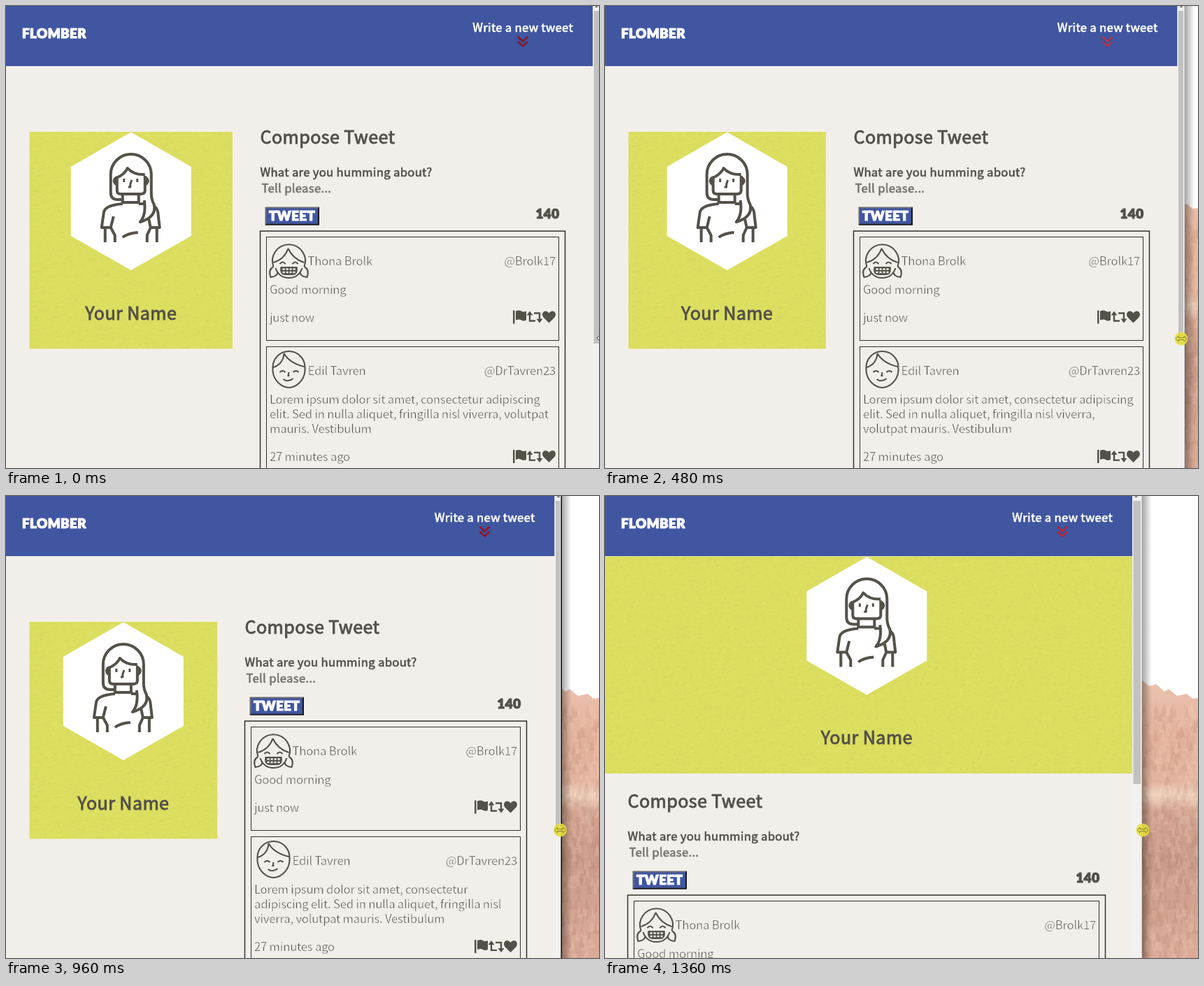
Write an HTML page with a canvas that moves like this. It is 848x661 px and loops after 1480 ms.

```html
<!DOCTYPE html>
<html lang="en">
<head>
<meta charset="utf-8">
<title>Responsive layout</title>
<style>
html, body { margin: 0; width: 100%; height: 100%; overflow: hidden; }
canvas { display: block; }
</style>
</head>
<body>
<canvas id="stage" width="848" height="661"></canvas>
<script>
const c = document.getElementById('stage').getContext('2d');
const LOOP = 1480, INK = '#545149', BLUE = '#4056a1', PAPER = '#f2efeb';
const SANS = '"Noto Sans CJK JP", "Noto Sans CJK SC", "Noto Sans", sans-serif';

// grow thickens (or thins, when negative) the letters, in pixels.
const LIGHT = { font: '400 16.7px ' + SANS, grow: -.5 };
const BOLD = { font: '400 16.7px ' + SANS, grow: .65 };
const HEAD = { font: '400 25.07px ' + SANS, grow: .95 };
const BLOCK = { font: '900 18.6px Lato, sans-serif', grow: 1.2 };
const LOREM = 'Lorem ipsum dolor sit amet, consectetur adipiscing elit. Sed in nulla aliquet, ' +
  'fringilla nisl viverra, volutpat mauris. Vestibulum';

// The picture only changes at these times.
const STEPS = [0, 130, 200, 270, 350, 420, 480, 550, 610, 680, 750, 820, 880, 960,
  1030, 1090, 1160, 1220, 1290, 1360];

// time, page width, window edge, pointer x, pointer y, edge line opacity, arrow red, arrow green
const KEYS = [
  [0, 839, 851, 853, 475, 1, 150, 20],
  [270, 838, 847, 842, 476, 1, 214, 48],
  [480, 818.5, 829, 824, 476, 0, 205, 55],
  [820, 794, 805.5, 803, 477, 1, 200, 26],
  [960, 784.5, 794.5, 792.5, 478, 1, 168, 15],
  [1090, 776.5, 785, 783.5, 478, 1, 84, 20],
  [1360, 754, 768, 769, 478, 0, 214, 36]
];

function sample(t) {
  let i = 0;
  while (i < KEYS.length - 2 && t >= KEYS[i + 1][0]) i++;
  const a = KEYS[i], b = KEYS[i + 1], f = Math.min(1, (t - a[0]) / (b[0] - a[0]));
  return a.map((v, k) => v + (b[k] - v) * f);
}

let seed = 7;
const rnd = () => (seed = seed * 16807 % 2147483647) / 2147483647;

function rect(x, y, w, h, color) {
  c.fillStyle = color;
  c.fillRect(x, y, w, h);
}

function frame(x, y, right, bottom, width) {
  c.strokeStyle = '#35322d';
  c.lineWidth = width;
  c.strokeRect(x, y, right - x, bottom - y);
}

function setType(style) {
  c.font = style.font;
  c.letterSpacing = style.grow * .45 + 'px';
}

function text(s, x, y, style, color = INK, align = 'left') {
  setType(style);
  c.textAlign = align;
  c.fillStyle = color;
  c.fillText(s, x, y);
  c.strokeStyle = style.grow < 0 ? PAPER : color;
  c.lineWidth = Math.abs(style.grow);
  c.strokeText(s, x, y);
}

function stroke(d, width, color = INK) {
  c.strokeStyle = color;
  c.lineWidth = width;
  c.stroke(new Path2D(d));
}

function fill(d, color = INK) {
  c.fillStyle = color;
  c.fill(new Path2D(d));
}

function at(x, y, draw) {
  c.save();
  c.translate(x, y);
  draw();
  c.restore();
}

function makeTexture() {
  const tile = document.createElement('canvas');
  tile.width = tile.height = 180;
  const g = tile.getContext('2d');
  g.fillStyle = '#dcde60';
  g.fillRect(0, 0, 180, 180);
  for (let i = 0; i < 1500; i++) {
    g.fillStyle = rnd() < .5 ? 'rgba(205,200,88,.4)' : 'rgba(230,232,112,.4)';
    g.fillRect(rnd() * 180, rnd() * 180, 1 + rnd() * 4, 1);
  }
  return c.createPattern(tile, 'repeat');
}
const texture = makeTexture();

function makeTrees() {
  let d = '';
  for (let i = 0; i < 260; i++) {
    d += `M${740 + rnd() * 110} ${295 + rnd() * 370}l4 ${12 + rnd() * 8}h-8Z`;
  }
  return d;
}
const darkTrees = makeTrees(), paleTrees = makeTrees();

function backdrop() {
  rect(0, 0, 848, 661, '#fff');
  const g = c.createLinearGradient(0, 265, 0, 661);
  [[0, '#ecc3af'], [.2, '#e2b09a'], [.36, '#e2b39d'], [.41, '#f0d2be'], [.47, '#d3a591'],
    [.65, '#c89a87'], [.85, '#d5a592'], [1, '#dbab97']].forEach(s => g.addColorStop(...s));
  fill('M740 262 L770 265 L778 272 L788 269 L800 280 L806 276 L818 286 L832 283 L840 290 L848 289 V661 H740Z', g);
  fill(darkTrees, 'rgba(150,95,75,.12)');
  fill(paleTrees, 'rgba(255,225,205,.15)');
}

function woman() {
  c.lineJoin = 'round';
  stroke('M-12 97H-19Q-29 97 -29 87V61A29 29 0 0 1 29 61V88Q29 97 33 104Q37 122 13 129Q22 119 19 98' +
    'M-20 65V84Q-20 89 -15 89H14Q20 89 20 84V63M-21 66Q-9 61 -5 52Q4 62 20 61' +
    'M-12 91V101H11V91M-20 65Q-28 70 -20 76M20 65Q28 70 20 76' +
    'M-12 103Q-38 105 -39 116L-42 137H-29L-25 121M11 103H19M34 107Q39 111 39 120L41 137H28L25 123' +
    'M-37 138V158M-29 137L-23 148V158M37 138V158M28 137L23 148V158M-12 151Q-4 145 10 144', 4);
  stroke('M-10 67V72M9 67V72M1 69L-1 75V79H-4', 3);
}

function profile(left, right, top, mid) {
  at(left, top, () => rect(0, 0, right - left, 310.5, texture));
  at(mid, top, () => {
    fill('M0 .5L86 50V149L0 198L-86 149V50Z', '#fff');
    woman();
  });
  text('Your Name', mid, top + 268.5, HEAD, INK, 'center');
}

function girl() {
  stroke('M5 38A23.500 23.500 0 1 1 49 38M8 40Q13 54 27 54T46 40' +
    'M5 32Q21 27 26 12Q33 27 49 32M5 38Q-3 42 1 53Q11 52 11 45M49 38Q57 42 53 53Q43 52 43 45' +
    'M14 34Q18 29 22 34M32 34Q36 29 40 34', 2.1);
  fill('M15 38H39Q41 50 32 50H22Q13 50 15 38Z');
  c.setLineDash([3.2, 1.8]);
  stroke('M18 41.500H37M18 46H36', 2.6, PAPER);
  c.setLineDash([]);
}

function boy() {
  stroke('M4 25A23 23 0 0 1 50 25V30C49 44 37 54 27 54S5 44 4 30Z' +
    'M5 25Q19 20 20 5Q28 19 49 24M14 32Q18 28 22 32M33 32Q37 28 41 32' +
    'M19 42Q26 47 33 41M27 32L26 37H28', 2.1);
}

function actions() {
  fill('M-61 -9H-58.500V10H-61ZM-57 -8Q-52 -10 -49 -8T-42 -8V5Q-46 7 -49 5T-57 5Z');
  stroke('M-37 -4V6H-29M-31 -5H-23V5', 2.4);
  fill('M-41.500 -2L-37 -8L-32.500 -2ZM-27.500 3L-23 9L-18.500 3Z');
  fill('M-9.500 9L-17.500 1C-22 -5 -15 -12 -9.500 -5C-4 -12 3 -5 -1.500 1Z');
}

function wrap(s, width) {
  setType(LIGHT);
  return s.split(' ').reduce((lines, word) => {
    const joined = lines[lines.length - 1] + ' ' + word;
    if (c.measureText(joined.trim()).width > width) lines.push(word);
    else lines[lines.length - 1] = joined.trim();
    return lines;
  }, ['']);
}

function post(L, R, y, avatar, name, handle, body, age) {
  const lines = wrap(body, R - L - 26), extra = (lines.length - 1) * 21.2;
  frame(L + 9, y, R - 9, y + 148 + extra, 1);
  at(L + 14, y + 4.5, avatar);
  text(name, L + 68, y + 40.5, LIGHT);
  text(handle, R - 13.5, y + 40.5, LIGHT, INK, 'right');
  lines.forEach((line, i) => text(line, L + 13.5, y + 81 + i * 21.2, LIGHT));
  text(age, L + 13.5, y + 121.5 + extra, LIGHT);
  at(R - 13.5, y + 114 + extra, actions);
}

function compose(left, right, dy) {
  const L = Math.floor(left) + .5, R = Math.floor(right) + .5;
  at(0, dy, () => {
    text('Compose Tweet', L, 197, HEAD);
    text('What are you humming about?', L, 244, BOLD);
    text('Tell please...', L + 2, 267, BOLD, '#777672');
    rect(L + 7, 287.5, 77.5, 26, '#6b6b70');
    fill(`M${L + 7} 313.500L${L + 9} 311.500H${L + 82.5}V289.500L${L + 84.5} 287.500V313.500Z`, '#15151a');
    rect(L + 9, 289.5, 73.5, 22, BLUE);
    text('TWEET', L + 45.7, 307, BLOCK, '#fff', 'center');
    text('140', R - 8, 304, BLOCK, INK, 'right');
    frame(L, 322, R, 700, 1.5);
    post(L, R, 330.5, girl, 'Thona Brolk', '@Brolk17', 'Good morning', 'just now');
    post(L, R, 487.5, boy, 'Edil Tavren', '@DrTavren23', LOREM, '27 minutes ago');
  });
}

function pointer(x, y, lit) {
  if (lit) {
    c.beginPath();
    c.arc(x, y, 9.5, 0, 7);
    c.fillStyle = 'rgba(228,222,62,.9)';
    c.fill();
  }
  at(x, y, () => {
    const arrow = 'M-8 0L-4 -4V-1.500H4V-4L8 0L4 4V1.500H-4V4Z';
    if (!lit) fill(arrow, '#fff');
    stroke(arrow, 1, lit ? '#8a8430' : '#333');
  });
}

function draw(t) {
  const [, w, edge, px, py, line, red, green] = sample(t);
  const narrow = w < 780;
  c.lineJoin = 'miter';
  c.miterLimit = 2;
  backdrop();

  const shade = c.createLinearGradient(edge, 0, edge + 14, 0);
  shade.addColorStop(0, 'rgba(0,0,0,.35)');
  shade.addColorStop(1, 'rgba(0,0,0,0)');
  rect(edge, 0, 14, 661, shade);

  rect(0, 0, edge, 661, PAPER);
  rect(0, 0, w, 86, BLUE);
  text('FLOMBER', 23, 46, BLOCK, '#fff');
  text('Write a new tweet', w - 28, 37, BOLD, '#fff', 'right');
  at(w - 100, 44, () => {
    const chevrons = 'M-7 0L0 6.500L7 0M-7 7L0 13.500L7 7';
    stroke(chevrons, 3, 'rgba(60,10,30,.35)');
    stroke(chevrons, 2, `rgb(${red},${green},${green + 6})`);
  });

  if (narrow) {
    profile(0, w, 86.5, w / 2 - 2.7);
    compose(w * .0437, w - 39, 249);
  } else {
    const right = .4 * w - 11.6;
    profile(33.5, right, 180, (33.5 + right) / 2);
    compose(.4 * w + 27.9, w - 39.8, 0);
  }

  rect(w, 0, edge - w, 661, '#f1f1f1');
  rect(w + 1.5, 7, edge - w - 3.5, narrow ? 405 : 476, '#c1c1c1');
  fill(`M${w + 3} 2H${w + 8}L${w + 5.5} -1Z`, '#777');
  rect(edge - 1, 0, 1.5, 661, `rgba(0,0,0,${.12 + .85 * line})`);
  pointer(px, py, t >= 200);
}

function tick() {
  const now = performance.now() % LOOP;
  draw(STEPS.filter(s => s <= now).pop());
  requestAnimationFrame(tick);
}
tick();
</script>
</body>
</html>
```
